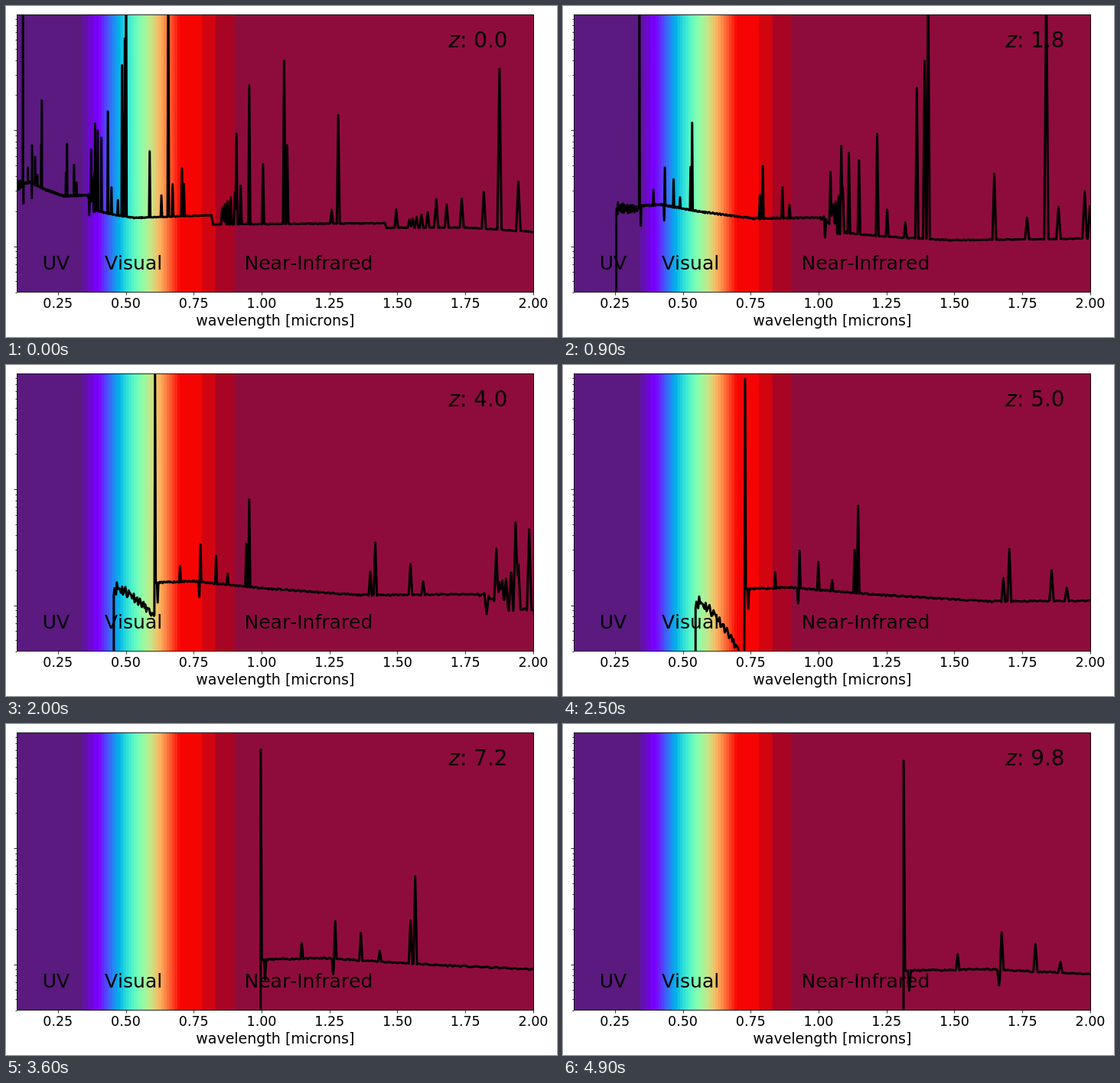
An HTML page that plays this animation: 720x432 px, repeating every 5000 ms.

```html
<!DOCTYPE html>
<html lang="en">
<head>
<meta charset="utf-8">
<title>Redshifted spectrum</title>
<style>
  html, body { margin: 0; width: 100%; height: 100%; overflow: hidden; background: #fff; }
  svg { display: block; width: 720px; height: 432px; }
  text { font-family: "DejaVu Sans", sans-serif; font-kerning: none; fill: #000; white-space: pre; }
  .tick { font-size: 17.5px; text-anchor: middle; }
  .axis { font-size: 19px; text-anchor: middle; }
  .band { font-size: 25px; }
  .shift { font-size: 27.8px; }
  .axes { fill: none; stroke: #000; stroke-width: 0.8; }
  #curve { fill: none; stroke: #000; stroke-width: 3; stroke-linejoin: round; }
</style>
</head>
<body>
<svg viewBox="0 0 720 432">
  <clipPath id="box"><rect x="14.5" y="11.5" width="675" height="362"/></clipPath>
  <g id="bands"></g>
  <g class="band">
    <text x="47.8" y="344">UV</text>
    <text x="129" y="344">Visual</text>
    <text x="311.5" y="344">Near-Infrared</text>
  </g>
  <g clip-path="url(#box)"><path id="curve"/></g>
  <rect class="axes" x="14.5" y="11.5" width="675" height="362"/>
  <path id="ticks" class="axes"/>
  <g id="labels"></g>
  <text class="axis" x="351.8" y="417">wavelength [microns]</text>
  <text class="shift" x="578.5" y="54"><tspan font-style="italic">z</tspan>: <tspan id="z">0.0</tspan></text>
</svg>
<script>
const $ = id => document.getElementById(id);
const LEFT = 14.5, RIGHT = 689.5, TOP = 11.5, BOTTOM = 373.5, DECADE = 151.5;
const RYDBERG = 0.0911763, LYA = RYDBERG * 4 / 3, WIDTH = 0.0042;
const FRAME = 100, FRAMES = 50, STEP = 0.2;
const px = um => LEFT + (um - 0.1) * 355;

function add(parent, tag, attrs, text) {
  const el = document.createElementNS(parent.namespaceURI, tag);
  for (const k in attrs) el.setAttribute(k, attrs[k]);
  if (text) el.textContent = text;
  parent.append(el);
}

// Each band reaches the right edge and is covered by the next one
function band(from, fill) {
  add($('bands'), 'rect', { x: px(from), y: TOP, width: RIGHT - px(from), height: BOTTOM - TOP, fill });
}

function drawBands() {
  band(0.1, '#5a1a80');
  band(0.34, '#6212a4');
  band(0.36, '#6c08cf');
  band(0.38, '#7700fa');
  const n = 30;
  for (let i = 0; i < n; i++) {
    const u = (i + 0.5) / n;
    const rgb = [Math.abs(2 * u - 0.5), Math.sin(Math.PI * u), Math.cos(Math.PI * u / 2)];
    band(0.4 + i * 0.01, `rgb(${rgb.map(c => Math.round(Math.min(1, c) * 252))})`);
  }
  band(0.7, '#f60404');
  band(0.78, '#d2040f');
  band(0.83, '#a80424');
  band(0.9, '#8e0c3c');
}

function drawAxes() {
  let d = '';
  for (let um = 0.25; um <= 2; um += 0.25) {
    d += `M${Math.round(px(um)) + 0.5} ${BOTTOM}v4`;
    add($('labels'), 'text', { class: 'tick', x: px(um), y: 394 }, um.toFixed(2));
  }
  for (let e = -1; e <= 2; e++) {
    for (let m = 1; m < 10; m++) {
      const y = 313.5 - DECADE * (e + Math.log10(m));
      if (y > TOP - 1 && y < BOTTOM + 1) d += `M${LEFT} ${Math.round(y) + 0.5}h${m > 1 ? -2 : -4}`;
    }
  }
  $('ticks').setAttribute('d', d);
}

// Continuum at rest: wavelength, stage height
const base = [
  [0.09, 234], [0.15, 230], [0.2, 239], [0.27, 248], [0.364, 247], [0.38, 266], [0.45, 272],
  [0.53, 276.5], [0.815, 273], [0.821, 285], [1.455, 283.5], [1.459, 289.5], [1.75, 289], [2.01, 295]
];

// Hydrogen lines fall off in height as the upper level m rises
function series(n, first, last, top, fall) {
  const out = [];
  for (let m = first; m <= last; m++) {
    out.push([RYDBERG / (1 / n ** 2 - 1 / m ** 2), top * ((n + 1) / m) ** fall]);
  }
  return out;
}

// The strongest other lines: wavelength, rise above the continuum
const others = [
  [0.1235, -26], [0.14, 20], [0.1541, -20], [0.155, 49], [0.1665, 36], [0.175, 14],
  [0.1888, 56], [0.1909, 114], [0.28, 30], [0.2837, 68], [0.3096, 40], [0.3189, 17],
  [0.3656, -24], [0.3728, 70], [0.387, 113], [0.397, 105], [0.4473, 35], [0.4711, 20],
  [0.4965, 232], [0.5012, 340], [0.5881, 86], [0.6312, 28], [0.6725, 42], [0.7069, 62],
  [0.7139, 42], [0.9075, 118], [0.9545, 181], [1.083, 213], [1.258, 18], [1.4957, 24], [1.643, 37]
];
const lines = [
  ...series(1, 2, 2, 274, 0),
  ...series(2, 3, 13, 325, 1.75),
  ...series(3, 4, 15, 210, 1.77),
  ...series(4, 8, 17, 198, 2.4),
  ...others
];

let seed = 11;
function noise() {
  seed = (seed * 16807) % 2147483647;
  return seed / 1073741823.5 - 1;
}

// 0 at the Lyman limit, 1 at Lyman alpha
const depth = um => (um - RYDBERG) / (LYA - RYDBERG);

function continuum(um) {
  let i = 1;
  while (i < base.length - 1 && base[i][0] < um) i++;
  const [x0, y0] = base[i - 1], [x1, y1] = base[i];
  return y0 + (y1 - y0) * (um - x0) / (x1 - x0);
}

function jitter(um) {
  const amp = um < LYA ? 10 - 7 * depth(um) : um < 0.36 ? 0.9 : um < 0.4 ? 3 : 0.5;
  return amp * noise();
}

function height(um) {
  let rise = 0;
  for (const [at, top] of lines) {
    const part = top * Math.max(0, 1 - Math.abs(um - at) / (at * WIDTH));
    if (Math.abs(part) > Math.abs(rise)) rise = part;
  }
  return continuum(um) - (rise || jitter(um));
}

function buildSpectrum() {
  const at = base.slice(1).map(p => p[0]);
  for (let um = RYDBERG; um < 2.01; um *= um < LYA ? 1.006 : 1.004) at.push(um);
  for (const [um] of lines) at.push(um * (1 - WIDTH), um, um * (1 + WIDTH));
  at.push(LYA - 0.0001);
  return at.sort((a, b) => a - b).map(um => [um, height(um)]);
}

// Absorption by gas in front, blueward of Lyman alpha
function absorb(um, z) {
  if (um > LYA - 0.00005) return 0;
  const r = (1 + z) / 7.2;
  return 46 * r ** 6.7 + 170 * r ** 3.8 * depth(um) ** 1.6;
}

function curve(z) {
  const u = Math.log10(1 + z);
  const dim = 48.6 * u + 37.3 * u * u;
  let d = `M${px(RYDBERG * (1 + z)).toFixed(2)} 500`;
  for (const [um, y] of spectrum) {
    const x = px(um * (1 + z));
    d += `L${x.toFixed(2)} ${Math.min(900, y + dim + absorb(um, z)).toFixed(2)}`;
    if (x > 700) break;
  }
  return d;
}

const spectrum = buildSpectrum();
let shown = -1;

function draw(now) {
  const i = Math.floor(now / FRAME) % FRAMES;
  if (i !== shown) {
    shown = i;
    $('curve').setAttribute('d', curve(i * STEP));
    $('z').textContent = (i * STEP).toFixed(1);
  }
}

function loop(now) {
  draw(now);
  requestAnimationFrame(loop);
}

drawBands();
drawAxes();
draw(0);
requestAnimationFrame(loop);
</script>
</body>
</html>
```
